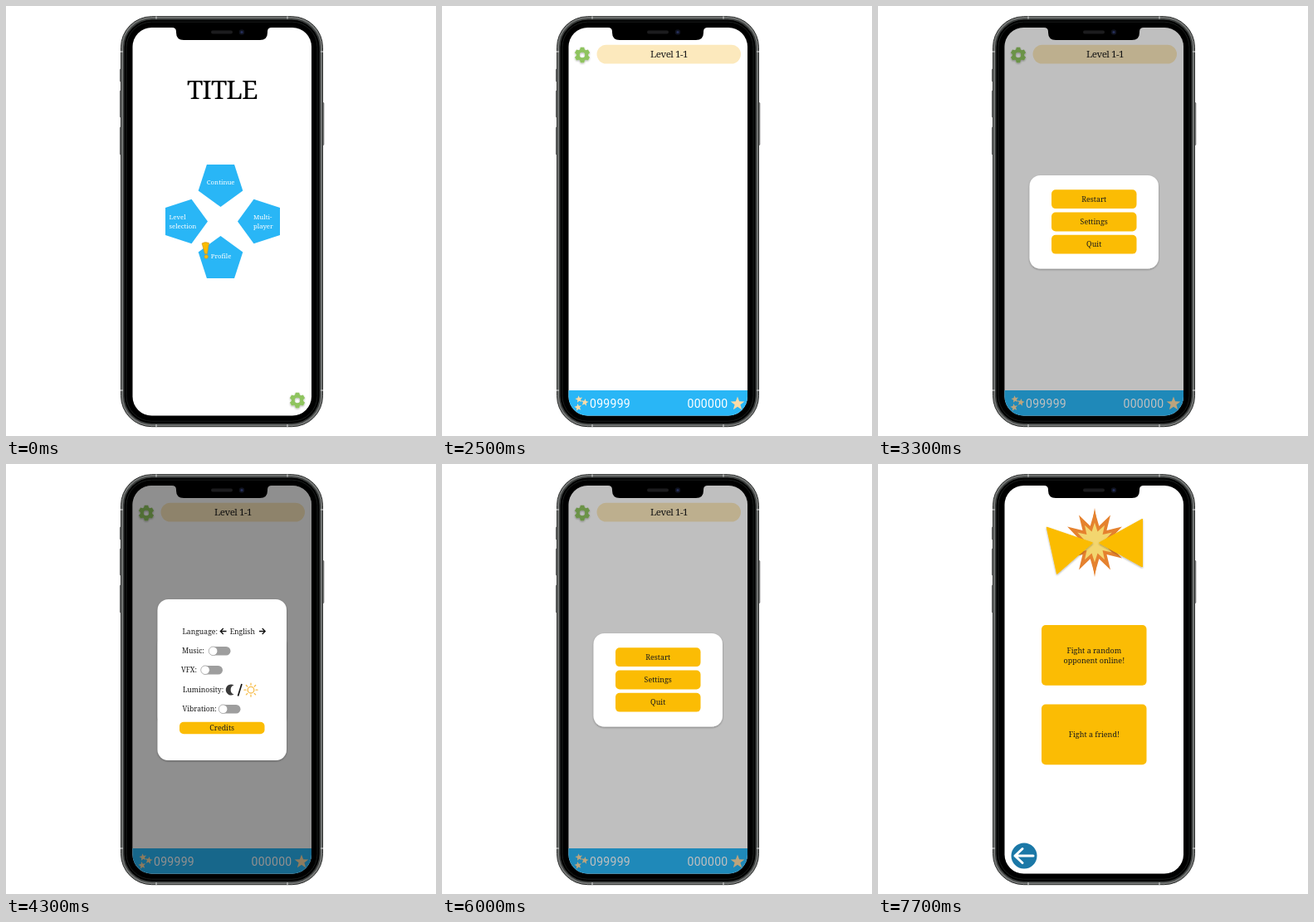
An HTML page that plays this animation: 518 px wide and 518 px high, repeating every 8000 ms.

```html
<!DOCTYPE html>
<html lang="en">
<head>
<meta charset="utf-8">
<title>Game menu prototype</title>
<style>
  html, body { margin: 0; width: 100%; height: 100%; overflow: hidden; background: #fff; }
  svg { display: block; width: 100vw; height: 100vh; }
  text { font-family: "Noto Serif", "Liberation Serif", serif; font-size: 8.6px; fill: #1c1c1c; }
  .mid { text-anchor: middle; }
  .title { font-size: 31.5px; letter-spacing: -.95px; fill: #000; }
  .tile { font-size: 7.8px; fill: #fff; }
  .level { font-size: 11.6px; letter-spacing: -.5px; font-weight: 500; }
  .menu { font-size: 8.9px; }
  .card { font-size: 9px; font-weight: 500; }
  .score { font: 14px Roboto, "Liberation Sans", sans-serif; letter-spacing: .3px; fill: #fff; }
</style>
</head>
<body>
<svg viewBox="0 0 518 518">
  <defs>
    <clipPath id="screenClip"><rect x="152.500" y="26" width="215.500" height="467.500" rx="23"/></clipPath>
    <filter id="drop" x="-20%" y="-20%" width="140%" height="150%">
      <feDropShadow dx="0" dy="1" stdDeviation=".8" flood-color="#000" flood-opacity=".35"/>
    </filter>
  </defs>

  <!-- side buttons -->
  <g fill="#9a9c9b" stroke="#3a3c3b" stroke-width=".6">
    <rect x="137.300" y="76" width="2" height="15" rx=".8"/>
    <rect x="137.300" y="102" width="2" height="32" rx=".8"/>
    <rect x="137.300" y="146" width="2" height="33" rx=".8"/>
    <rect x="380.900" y="116.500" width="2" height="51" rx=".8"/>
  </g>
  <!-- metal rim and bezel -->
  <rect x="138.500" y="12.700" width="243" height="494" rx="37" fill="#747675" stroke="#2b2d2c"/>
  <rect x="141.700" y="15.900" width="236.600" height="487.600" rx="34" fill="#000" stroke="#3a3d3c" stroke-width="1.600"/>
  <rect x="145" y="19.200" width="230" height="481" rx="30.500" fill="#000" stroke="#1b1e1d"/>
  <path d="M138 55h3M379 55h3M138 463h3M379 463h3M181 12.500v3M339 12.500v3M181 504v3M339 504v3" stroke="#b5b7b6" stroke-width="1.500"/>

  <g clip-path="url(#screenClip)">
    <rect x="152" y="26" width="216" height="468" fill="#fff"/>
    <g id="home"></g>
    <g id="level"></g>
    <g id="pause"></g>
    <g id="settings"></g>
    <g id="versus"></g>
  </g>

  <!-- notch -->
  <path d="M200 25.500h120v.5q-5 0-5 5v1q0 9-9 9H214q-9 0-9-9v-1q0-5-5-5z" fill="#000"/>
  <rect x="247" y="29.500" width="26" height="4" rx="2" fill="#1c1c1e"/>
  <circle cx="284" cy="31.500" r="3.200" fill="#10131f"/>
  <circle cx="284" cy="31.500" r="1.500" fill="#27305c"/>
</svg>

<script>
const BLUE = '#29b6f6', AMBER = '#fbbc04', SAND = '#fbdba7', GREEN = '#8fc45f';
const $ = id => document.getElementById(id);

const label = (x, y, s, cls = '') => `<text x="${x}" y="${y}" class="${cls}">${s}</text>`;
const box = (x, y, w, h, r, fill, extra = '') =>
  `<rect x="${x}" y="${y}" width="${w}" height="${h}" rx="${r}" fill="${fill}" ${extra}/>`;
const poly = (pts, fill, extra = '') => `<polygon points="${pts}" fill="${fill}" ${extra}/>`;
const polar = (cx, cy, r, deg) => {
  const a = deg * Math.PI / 180;
  return [cx + r * Math.cos(a), cy + r * Math.sin(a)].map(v => v.toFixed(2)).join();
};

// Star with n spikes; a regular polygon when inner is 0.
function star(cx, cy, n, outer, inner, turn, fill) {
  const pts = [];
  for (let i = 0; i < n; i++) {
    pts.push(polar(cx, cy, outer, turn + i * 360 / n));
    if (inner) pts.push(polar(cx, cy, inner, turn + (i + .5) * 360 / n));
  }
  return poly(pts.join(' '), fill);
}

function gear(cx, cy) {
  let teeth = '';
  for (let i = 0; i < 6; i++)
    teeth += `<path d="M-3-6l.8-3.200h4.400l.8 3.200z" transform="rotate(${i * 60})"/>`;
  return `<g transform="translate(${cx} ${cy})" filter="url(#drop)" fill="${GREEN}">${teeth}
    <circle r="5.200" fill="none" stroke="${GREEN}" stroke-width="4"/></g>`;
}

function toggle(x, y) {
  return box(x + 1, y - 5.2, 26, 10.4, 5.2, '#9e9e9e') +
    `<circle cx="${x + 6}" cy="${y}" r="5.300" fill="#fff" stroke="#999" stroke-width=".7"/>`;
}

const shade = box(152, 26, 216, 468, 0, '#000', 'opacity=".25"');
const panel = (y, h) => box(182.5, y, 155.5, h, 13, '#fff', 'filter="url(#drop)"');
const button = (y, h, s, base) => box(209, y, 102.5, h, 5, AMBER) + label(260.2, base, s, 'mid menu');

function homeScreen() {
  const tiles = [[258.5, 213.8, 90], [214.8, 259.5, 0], [307.2, 259.5, 180], [258.5, 305.2, -90]];
  return label(218, 112, 'TITLE', 'title') +
    tiles.map(([x, y, turn]) => star(x, y, 5, 28.2, 0, turn, BLUE)).join('') +
    label(258.7, 214.5, 'Continue', 'mid tile') +
    label(196.5, 256.5, 'Level', 'tile') + label(196.5, 267.7, 'selection', 'tile') +
    label(298, 256.5, 'Multi-', 'tile') + label(298, 267.7, 'player', 'tile') +
    label(246.7, 304, 'Profile', 'tile') +
    `<g fill="${AMBER}" stroke="#c9932b" stroke-width=".6">
      <path d="M236 286q4-2.500 8.500-.5l-2 13h-3z"/><circle cx="241.200" cy="302" r="2.300"/></g>` +
    gear(351, 475);
}

function levelScreen() {
  const small = [[165, 473.7, -100], [172, 477.5, -80], [164, 483.5, -100]];
  return gear(169, 59) +
    box(186.5, 46.7, 173.5, 22.8, 11.4, '#fce9bd') + label(251, 62, 'Level 1-1', 'level') +
    box(152, 463, 216, 31, 0, BLUE) +
    small.map(([x, y, turn]) => star(x, y, 5, 4.6, 2, turn, SAND)).join('') +
    star(356, 479.2, 5, 8.8, 3.6, -90, SAND) +
    label(178, 483.7, '099999', 'score') + label(295.5, 483.7, '000000', 'score');
}

function pauseMenu() {
  return shade + panel(204, 112.5) + button(221.3, 22.8, 'Restart', 236) +
    button(248.6, 22.8, 'Settings', 263) + button(275.8, 22.8, 'Quit', 290.2);
}

function settingsMenu() {
  let rays = '';
  for (let i = 0; i < 8; i++)
    rays += `M${polar(295, 272.2, 6, i * 45)}L${polar(295, 272.2, 8, i * 45)}`;
  return shade + panel(163, 194) +
    label(212.5, 204.7, 'Language:') + label(269.7, 204.7, 'English') +
    `<path d="M265.500 201.500h-7m3.300-3.500l-3.500 3.500l3.500 3.500M305 201.500h7m-3.300-3.500l3.500 3.500l-3.500 3.500"
      fill="none" stroke="#111" stroke-width="1.300"/>` +
    label(212, 228.2, 'Music:') + toggle(243.5, 225.3) +
    label(211, 251.3, 'VFX:') + toggle(234, 248.2) +
    label(213, 275, 'Luminosity:') +
    `<path d="M274.500 266.200a6.600 6.600 0 1 0 0 11.600a6.300 6.300 0 0 1 0-11.600z" fill="#3a3a3a"/>
     <path d="M284 265l-4.500 14.500" stroke="#111" stroke-width="1.700"/>
     <g fill="none" stroke="#f6bd4b" stroke-width="1.300" stroke-linecap="round">
       <circle cx="295" cy="272.200" r="3.800"/><path d="${rays}"/></g>` +
    label(212.5, 298.2, 'Vibration:') + toggle(255.5, 295.2) +
    button(310.8, 14.4, 'Credits', 321);
}

function versusScreen() {
  const card = y => box(197, y, 126.5, 72.7, 5, AMBER);
  const wedge = pts => poly(pts, AMBER,
    `stroke="${AMBER}" stroke-width="1.500" stroke-linejoin="round" filter="url(#drop)"`);
  // Upright spikes reach further than the rest of the burst.
  return star(261, 94.5, 12, 38, 20.5, -90, '#e5822f') +
    star(261, 94.5, 2, 41.5, 7, -90, '#e5822f') +
    star(261, 94.5, 12, 24, 13.5, -90, '#f3d66f') +
    wedge('203.500,76.500 258,95 215.700,132') + wedge('318.300,66.700 318.300,123.500 267,95') +
    card(194) + label(260.3, 228.2, 'Fight a random', 'mid card') +
    label(260.3, 239.6, 'opponent online!', 'mid card') +
    card(289.5) + label(260.3, 329.3, 'Fight a friend!', 'mid card') +
    `<circle cx="176" cy="472" r="15.500" fill="#1b78a7"/>
     <path d="M187 472h-22m9-8.500l-9 8.500l9 8.500" fill="none" stroke="#fff" stroke-width="3"
       stroke-linecap="round" stroke-linejoin="round"/>`;
}

const layers = { home: homeScreen, level: levelScreen, pause: pauseMenu, settings: settingsMenu, versus: versusScreen };
for (const id in layers) $(id).innerHTML = layers[id]();

// Each tap switches the visible layers at once.
const LOOP = 8000;
const steps = [
  [0, 'home'], [800, 'level'], [2800, 'level pause'], [4300, 'level pause settings'],
  [5500, 'level pause'], [6500, 'home'], [7600, 'versus']
];

function draw(t) {
  const shown = steps.filter(([at]) => at <= t).pop()[1].split(' ');
  for (const id in layers) $(id).style.display = shown.includes(id) ? '' : 'none';
}

const start = performance.now();
function tick() {
  draw((performance.now() - start) % LOOP);
  requestAnimationFrame(tick);
}
tick();
</script>
</body>
</html>
```
